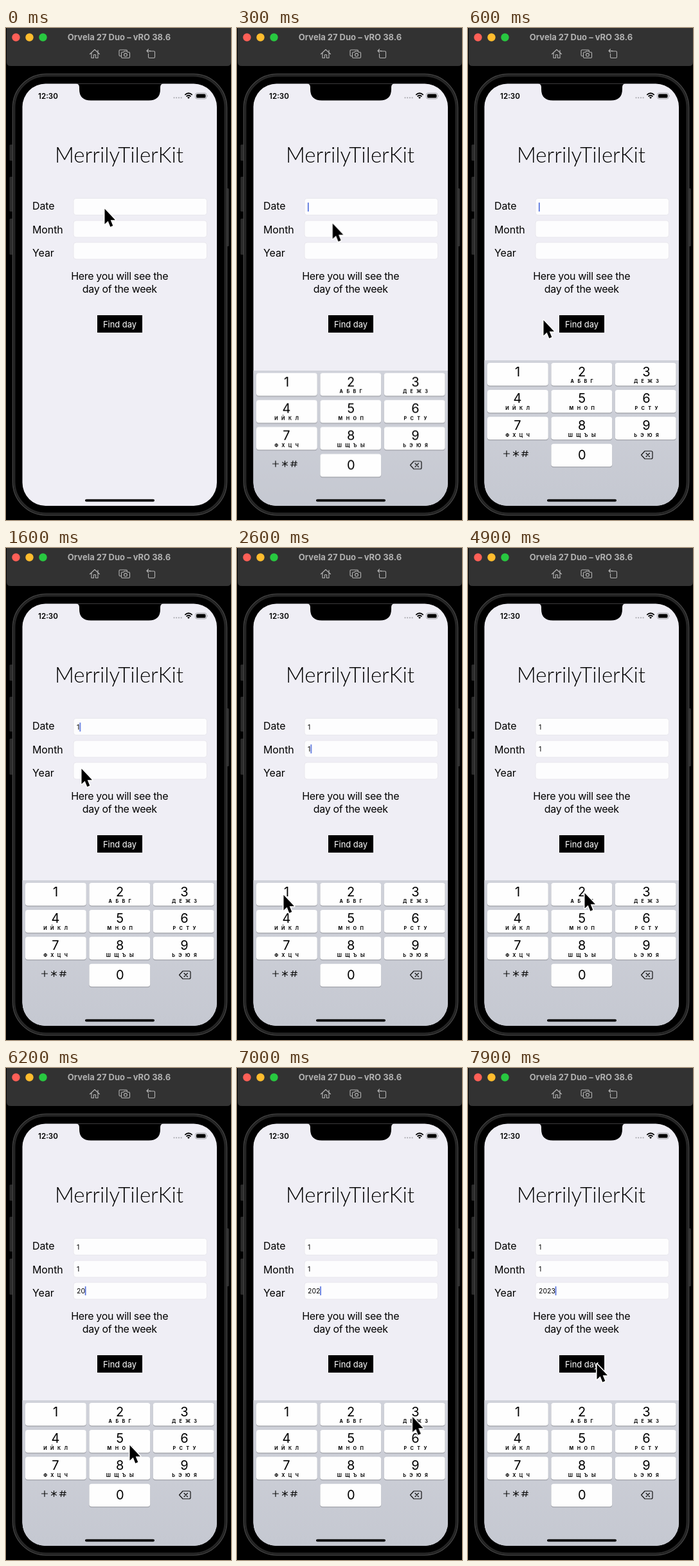
These frames come from a looping animation (350 px wide and 764 px high, 8000 ms). An HTML page:

```html
<!DOCTYPE html>
<html lang="en">
<head>
<meta charset="utf-8">
<title>Day finder</title>
<style>
  html, body { margin: 0; width: 100%; height: 100%; overflow: hidden; background: #000; }
  svg { display: block; width: 350px; height: 764px; font-family: Inter, "Liberation Sans", sans-serif; }
  .mid { text-anchor: middle; }
  .bar { font-size: 13px; font-weight: 700; fill: #b1b1b1; }
  .clock { font-size: 11.6px; font-weight: 600; }
  .title { font: 300 33px Lato, "Open Sans", sans-serif; }
  .label { font-size: 16px; letter-spacing: -.1px; }
  .hint { font-size: 16px; letter-spacing: -.33px; }
  .entry { font-size: 10.5px; }
  .digit { font-size: 20px; }
  .letters { font-size: 7.2px; font-weight: 700; letter-spacing: 5.4px; }
  .line { fill: none; stroke: #b4b4b4; stroke-width: 1.1; stroke-linecap: round; stroke-linejoin: round; }

  #pad { animation: rise 8s infinite; }
  @keyframes rise {
    0%, 1.25% { transform: translateY(228px); animation-timing-function: cubic-bezier(.2, .8, .3, 1); }
    6.25%, 100% { transform: none; }
  }

  #pointer { animation: point 8s ease-in-out infinite; }
  @keyframes point {
    0%, 2.5% { transform: translate(153px, 280px); }
    7.5% { transform: translate(117px, 453px); }
    11.25%, 14.375% { transform: translate(75px, 538px); }
    20% { transform: translate(117px, 342px); }
    22.5%, 24.375% { transform: translate(124px, 309px); }
    28.75%, 35% { transform: translate(72px, 538px); }
    42.5% { transform: translate(130px, 388px); }
    46.25%, 53.75% { transform: translate(145px, 346px); }
    61.25%, 65% { transform: translate(181px, 535px); }
    70%, 74.375% { transform: translate(192px, 672px); }
    77.5% { transform: translate(192px, 585px); }
    80%, 84.375% { transform: translate(195px, 541px); }
    88.75%, 95% { transform: translate(288px, 541px); }
    98.75%, 100% { transform: translate(200px, 459px); }
  }

  /* Typed digits appear one at a time. */
  .entry tspan { animation: 8s step-end infinite; }
  #day { animation-name: day; }
  #month { animation-name: month; }
  #y1 { animation-name: y1; }
  #y2 { animation-name: y2; }
  #y3 { animation-name: y3; }
  #y4 { animation-name: y4; }
  @keyframes day { 0% { fill-opacity: 0; } 13.75%, 100% { fill-opacity: 1; } }
  @keyframes month { 0% { fill-opacity: 0; } 32.5%, 100% { fill-opacity: 1; } }
  @keyframes y1 { 0% { fill-opacity: 0; } 65%, 100% { fill-opacity: 1; } }
  @keyframes y2 { 0% { fill-opacity: 0; } 72.5%, 100% { fill-opacity: 1; } }
  @keyframes y3 { 0% { fill-opacity: 0; } 85%, 100% { fill-opacity: 1; } }
  @keyframes y4 { 0% { fill-opacity: 0; } 91.25%, 100% { fill-opacity: 1; } }

  #caret { animation: place 8s step-end infinite, blink 8s step-end infinite; }
  @keyframes place {
    0% { transform: translate(110px, 271px); }
    13.75% { transform: translate(114.5px, 271px); }
    23.75% { transform: translate(110px, 305px); }
    32.5% { transform: translate(114.5px, 305px); }
    47.5% { transform: translate(110px, 339px); }
    65% { transform: translate(116.3px, 339px); }
    72.5% { transform: translate(122.8px, 339px); }
    85% { transform: translate(129.2px, 339px); }
    91.25%, 100% { transform: translate(135.7px, 339px); }
  }
  @keyframes blink {
    0%, 10%, 21.25%, 28.75%, 38.75%, 53.75%, 60%, 78.75% { opacity: 0; }
    3.75%, 13.75%, 23.75%, 32.5%, 41.25%, 47.5%, 56.25%, 65%, 81.25%, 100% { opacity: 1; }
  }
</style>
</head>
<body>
<svg viewBox="0 0 350 764">
  <defs>
    <clipPath id="screen"><rect x="25.5" y="86.5" width="302.500" height="655.500" rx="36"/></clipPath>
    <linearGradient id="padFill" x2="0" y2="1">
      <stop stop-color="#d0d2da"/><stop offset="1" stop-color="#c5c8d1"/>
    </linearGradient>
  </defs>
  <rect width="350" height="764"/>

  <!-- window bar -->
  <path d="M1 0H350V53Q350 59 344 59H7Q1 59 1 53Z" fill="#323232"/>
  <circle cx="15.500" cy="14.500" r="6.200" fill="#fe5f57"/>
  <circle cx="36.500" cy="14.500" r="6.200" fill="#febc2e"/>
  <circle cx="57.500" cy="14.500" r="6.200" fill="#28c840"/>
  <text class="bar mid" x="176" y="19">Orvela 27 Duo – vRO 38.6</text>
  <g class="line">
    <path d="M130.500 40.500L138 33.500L145.500 40.500M133 39V46.500H136.500V41.500H139.500V46.500H143V39M143 37V34.500"/>
    <path d="M178.500 43.500H177.500Q176 43.500 176 42V35.500Q176 34 177.500 34H187Q188.500 34 188.500 35.500"/>
    <path d="M181 37.500H183L184 36H188L189 37.500H191Q192.500 37.500 192.500 39V45Q192.500 46.500 191 46.500H181Q179.500 46.500 179.500 45V39Q179.500 37.500 181 37.500Z"/>
    <circle cx="186" cy="41.800" r="2.400"/>
    <path d="M223 36H230Q231.500 36 231.500 37.500V45Q231.500 46.500 230 46.500H223Q221.500 46.500 221.500 45V40M219 35.500H225M221.500 33L219 35.500L221.500 38"/>
  </g>

  <!-- phone body -->
  <g fill="#2b2b2b">
    <rect x="5.500" y="181" width="6" height="25" rx="1.500"/>
    <rect x="5.500" y="231" width="6" height="54" rx="1.500"/>
    <rect x="5.500" y="296" width="6" height="56" rx="1.500"/>
    <rect x="342" y="249" width="5" height="90" rx="1.500"/>
  </g>
  <rect x="10.500" y="71.500" width="333" height="685" rx="52" stroke="#444" stroke-width="1.500"/>
  <rect x="13" y="74" width="328" height="680" rx="49.500" fill="none" stroke="#262626" stroke-width="3"/>

  <g clip-path="url(#screen)">
    <rect x="25" y="86" width="304" height="657" fill="#efeef5"/>
    <path d="M109 86Q114 87 114 92V95Q114 112.500 132 112.500H222Q240 112.500 240 95V92Q240 87 245 86Z"/>

    <!-- status -->
    <text class="clock" x="50" y="110">12:30</text>
    <g fill="#aaaab0">
      <circle cx="261.500" cy="108.300" r="1.100"/><circle cx="265.200" cy="108.300" r="1.100"/>
      <circle cx="268.900" cy="108.300" r="1.100"/><circle cx="272.600" cy="108.300" r="1.100"/>
    </g>
    <g fill="none" stroke="#000" stroke-width="1.800">
      <path d="M278.300 103.800Q284 98.700 289.700 103.800M280.500 106.300Q284 103.200 287.500 106.300"/>
    </g>
    <path d="M282 107.800Q284 106.300 286 107.800L284 110Z"/>
    <rect x="294.500" y="101" width="17.500" height="9" rx="2.800" fill="none" stroke="#96969b" stroke-width=".8"/>
    <rect x="296" y="102.400" width="14.500" height="6.200" rx="1.600"/>
    <path d="M313 104Q314.600 105.500 313 107Z" fill="#96969b"/>

    <text class="title mid" x="176" y="208.500">MerrilyTilerKit</text>

    <!-- form -->
    <g class="label">
      <text x="41" y="282">Date</text>
      <text x="41" y="319">Month</text>
      <text x="41" y="355">Year</text>
    </g>
    <g fill="#fdfdfe" stroke="#e5e4ea" stroke-width=".8">
      <rect x="105" y="264.500" width="207.500" height="26" rx="4"/>
      <rect x="105" y="299" width="207.500" height="26" rx="4"/>
      <rect x="105" y="333" width="207.500" height="26" rx="4"/>
    </g>
    <g class="entry">
      <text x="110" y="281.500"><tspan id="day">1</tspan></text>
      <text x="110" y="315.700"><tspan id="month">1</tspan></text>
      <text x="110" y="349.800"><tspan id="y1">2</tspan><tspan id="y2">0</tspan><tspan id="y3">2</tspan><tspan id="y4">3</tspan></text>
    </g>
    <rect id="caret" width="1.500" height="14" rx=".6" fill="#3f5fd8"/>
    <text class="hint mid" x="176.700" y="391">Here you will see the</text>
    <text class="hint mid" x="176.700" y="411">day of the week</text>
    <rect x="142" y="446" width="70" height="27"/>
    <text class="mid" x="177" y="464.500" font-size="12.900" fill="#fff">Find day</text>

    <g id="pad">
      <rect x="25" y="516" width="304" height="227" fill="url(#padFill)"/>
      <g id="keys"></g>
      <g fill="none" stroke="#111" stroke-width="1.200" stroke-linecap="round" stroke-linejoin="round">
        <path d="M55.500 661H64.500M60 656.500V665.500"/>
        <path d="M74.500 656.500V665.500M70.600 658.700L78.400 663.300M78.400 658.700L70.600 663.300"/>
        <path d="M87 656.500L85.500 665.500M91.500 656.500L90 665.500M84 659.300H93.500M83.500 662.700H93"/>
        <path d="M275 657H285Q287 657 287 659V667Q287 669 285 669H275L269.500 663Z"/>
        <path d="M277 660.300L282.500 665.700M282.500 660.300L277 665.700"/>
      </g>
    </g>
    <rect x="123" y="731.700" width="108" height="3.800" rx="1.900"/>
  </g>

  <g id="pointer" stroke-linejoin="round">
    <path id="arrow" d="M.5 .8V24.500L5.700 19.700L9.300 28.800L13.300 27L9.700 18.300H17Z" fill="#fff" stroke="#fff" stroke-width="3.200"/>
    <path d="M.5 .8V24.500L5.700 19.700L9.300 28.800L13.300 27L9.700 18.300H17Z"/>
  </g>
</svg>
<script>
  const letters = ["", "АБВГ", "ДЕЖЗ", "ИЙКЛ", "МНОП", "РСТУ", "ФХЦЧ", "ШЩЪЫ", "ЬЭЮЯ"];

  function key(digit, col, row, sub) {
    const x = 30 + col * 99.4, y = 520 + row * 41.9, mid = 77 + col * 100.2;
    const base = y + (digit ? 20.5 : 24.3);
    return `<rect x="${x}" y="${y + 1}" width="94.8" height="35.5" rx="4" fill="#8d8f96"/>
      <rect x="${x}" y="${y}" width="94.8" height="35.5" rx="4" fill="#fefefe"/>
      <text class="digit mid" x="${mid}" y="${base}">${digit}</text>
      <text class="letters mid" x="${mid + 2.7}" y="${y + 31}">${sub}</text>`;
  }

  document.getElementById("keys").innerHTML =
    letters.map((sub, i) => key(i + 1, i % 3, Math.floor(i / 3), sub)).join("") + key(0, 1, 3, "");
</script>
</body>
</html>
```
